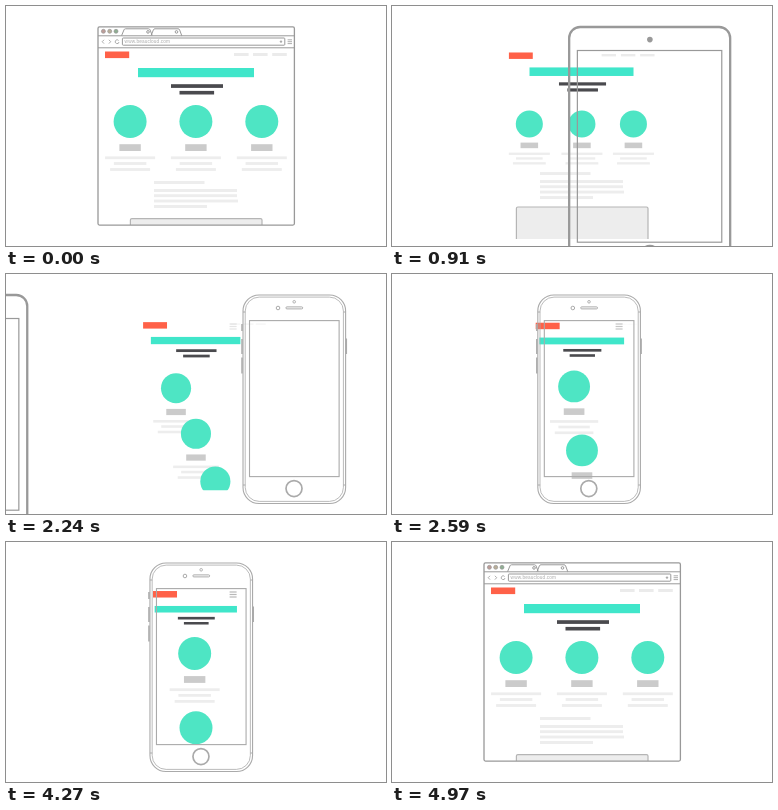
These frames come from a looping animation (380 by 240 pixels, 5320 ms). An HTML page:

```html
<!DOCTYPE html>
<html lang="en">
<head>
<meta charset="utf-8">
<title>Responsive layout</title>
<style>
html, body { margin: 0; width: 100%; height: 100%; overflow: hidden; background: #fff; }
svg { display: block; width: 100vw; height: 100vh; }
.line { fill: none; stroke: #999; }
text { font: 4.7px "Liberation Sans", Arial, sans-serif; letter-spacing: .15px; fill: #aaa; }
</style>
</head>
<body>
<svg viewBox="0 0 380 240">
  <defs>
    <clipPath id="clip"><rect id="clipRect" width="380" height="219"/></clipPath>
  </defs>
  <g id="page" clip-path="url(#clip)"></g>

  <g id="browser" class="line" stroke-width="1">
    <rect x="92" y="20.9" width="196.4" height="198.2" rx="1.5" stroke-width="1.3"/>
    <path d="M92 29.8H115.5M175.5 29.8H288.4M92 41.8H288.4"/>
    <path d="M115.5 29.8L118 23.8Q118.4 22.8 119.5 22.8H142.5Q143.6 22.8 144 23.8L146.2 29.4M115.5 29.8H145L147.4 23.8Q147.8 22.8 149 22.8H172Q173.2 22.8 173.6 23.8L175.8 29.8H145"/>
    <circle cx="142" cy="25.9" r="1.3"/>
    <circle cx="170.5" cy="25.9" r="1.3"/>
    <g stroke-width=".7">
      <circle cx="97.4" cy="25.3" r="2" fill="#bd9d98"/>
      <circle cx="103.7" cy="25.3" r="2" fill="#b9ae98"/>
      <circle cx="110" cy="25.3" r="2" fill="#8fae92"/>
    </g>
    <path stroke-width=".8" d="M98 33.8L96.2 35.7L98 37.6M102.9 33.8L104.7 35.7L102.9 37.6M112.6 34.5A1.9 1.9 0 1 0 113 36M281.6 33.8H286M281.6 35.7H286M281.6 37.6H286"/>
    <rect x="116.4" y="32" width="162.4" height="7.2" rx=".8"/>
    <circle cx="275" cy="35.6" r="1.2" fill="#aaa" stroke="none"/>
    <text x="118.6" y="37.2" stroke="none">www.beaucloud.com</text>
  </g>

  <g id="tablet" class="line">
    <rect x="109.3" y="21" width="161" height="260" rx="11" stroke-width="2.3"/>
    <rect x="117.5" y="44.5" width="144.4" height="191.7" stroke-width="1.2"/>
    <circle cx="190" cy="33.6" r="2.8" fill="#999" stroke="none"/>
    <circle cx="190" cy="249" r="9.6" stroke-width="1.3"/>
  </g>

  <g id="phone" class="line" style="stroke:#aaa">
    <rect x="139" y="21" width="102.6" height="208.5" rx="16" stroke-width="1.1"/>
    <rect x="141.2" y="23.1" width="98.2" height="204.3" rx="14" stroke-width=".8"/>
    <path stroke-width="1" d="M139 38H141.4M239.4 38H241.8M139 211H141.4M239.4 211H241.8"/>
    <path stroke-width="1.5" d="M138 50V57M138 65V80M138 83.5V99.5M242.3 64.5V80"/>
    <rect x="145.5" y="46.6" width="89.6" height="156" stroke-width="1.1"/>
    <circle cx="190.2" cy="27.8" r="1.3" stroke-width=".9"/>
    <circle cx="174" cy="34" r="1.8" stroke-width="1"/>
    <rect x="181.9" y="32.9" width="16.8" height="2" rx="1" stroke-width="1"/>
    <circle cx="190" cy="214.6" r="8" stroke-width="1.7"/>
  </g>
</svg>
<script>
const LOOP = 5320, STEP = 70;
const NS = "http://www.w3.org/2000/svg";
const byId = id => document.getElementById(id);
const page = byId("page");

const clamp = v => Math.max(0, Math.min(1, v));
const span = (t, from, to) => clamp((t - from) / (to - from));
const sineInOut = u => (1 - Math.cos(Math.PI * u)) / 2;
const sineOut = u => Math.sin(Math.PI / 2 * u);
const steepInOut = u => u < .5 ? (2 * u) ** 2.25 / 2 : 1 - (2 - 2 * u) ** 2.25 / 2;

function make(name, fill) {
  const el = document.createElementNS(NS, name);
  el.setAttribute("fill", fill);
  return page.appendChild(el);
}
function set(el, attrs) {
  for (const k in attrs) el.setAttribute(k, attrs[k]);
}
function box(el, x, y, width, height) {
  set(el, { x, y, width, height });
}
function slide(id, x) {
  byId(id).setAttribute("transform", `translate(${x} 0)`);
}

// Every value triple or row is ordered desktop, tablet, phone.
const bars = [
  ["#ff6148", [99, 45.5, 24.2, 6.6], [120.8, 46.7, 23.8, 6.4], [148, 49.1, 24, 6.5]],
  ["#40e6ca", [132, 62, 116, 9.2], [138.7, 61.3, 101.4, 8.4], [149, 64, 81.6, 6.5]],
  ["#4a4a4e", [165, 78.2, 52, 3.7], [167.4, 75.9, 46, 3.1], [172, 74.8, 36.6, 2.6]],
  ["#4a4a4e", [173.5, 84.9, 34.6, 3.6], [175.8, 81.8, 29.7, 3.1], [178, 79.9, 24.5, 2.5]]
].map(([fill, ...rows]) => ({ el: make("rect", fill), rows }));

// Extra sideways swing while the menu folds.
const nav = [
  { x: [228, 205.6, 223.5], swing: 33 },
  { x: [247, 225, 223.5], swing: 56 },
  { x: [266.2, 244.2, 223.5], swing: 75 }
].map(n => ({ ...n, el: make("rect", "#ebebeb") }));

const burger = [49.4, 51.9, 54.4].map(y => {
  const el = make("rect", "#b8b8b8");
  box(el, 223.6, y, 7, 1.2);
  return el;
});

const textLines = [[0, 50.5], [8, 83], [13.2, 83], [18.5, 84], [24, 53]]
  .map(([dy, w]) => ({ dy, w, el: make("rect", "#ededed") }));

const panel = make("rect", "#ededed");
set(panel, { stroke: "#b5b5b5", "stroke-width": 1.2, rx: 1.5 });

const columns = [
  { x: [124.1, 140.2, 190], y: [115.5, 118.5, 111.3] },
  { x: [189.9, 189.9, 190], y: [115.5, 118.5, 187.3] },
  { x: [255.8, 238.3, 190], y: [115.5, 118.5, 267] }
].map(c => ({
  ...c,
  disc: make("circle", "#4ee5c4"),
  label: make("rect", "#cbcbcb"),
  rows: [[36.3, 50], [42, 32.5], [48, 40]].map(([dy, w]) => ({ dy, w, el: make("rect", "#ededed") }))
}));

function drawPage(from, to, p) {
  const mix = v => v[from] + (v[to] - v[from]) * p;
  const folding = from === 1 && to === 2;
  const folded = (from === 2 ? 1 - p : 0) + (to === 2 ? p : 0);

  byId("clipRect").setAttribute("height", mix([219, 236, 203]));

  for (const { el, rows } of bars)
    box(el, ...rows[0].map((_, i) => mix(rows.map(r => r[i]))));

  for (const { el, x, swing } of nav) {
    box(el, mix(x) + (folding ? swing * p * (1 - p) : 0),
      mix([47, 48.2, 50]), mix([14.6, 14.4, 7]), mix([3, 2.3, 1.2]));
    el.setAttribute("opacity", 1 - folded);
  }
  for (const el of burger) el.setAttribute("opacity", clamp((folded - .4) / .55));

  const top = mix([176.5, 165.6, 288]);
  for (const { el, dy, w } of textLines) box(el, 148, top + dy - 1.45, w, 2.9);
  box(panel, 124.4, mix([212.6, 198.5, 400]), 131.6, 80);

  const r = mix([16.5, 12.9, 16.5]), s = r / 16.5;
  for (const { x, y, disc, label, rows } of columns) {
    const cx = mix(x), cy = mix(y);
    const centred = (el, dy, w, h) => box(el, cx - w * s / 2, cy + (dy - h / 2) * s, w * s, h * s);
    set(disc, { cx, cy, r });
    centred(label, 26.1, 21.4, 6.8);
    for (const { el, dy, w } of rows) centred(el, dy, w, 2.8);
  }
}

function draw(t) {
  const toTablet = sineInOut(span(t, 0, 1260));
  const toPhone = sineOut(span(t, 1610, 3150));
  const toDesktop = sineInOut(span(t, 4200, 4970));

  if (t < 1610) drawPage(0, 1, toTablet);
  else if (t < 4200) drawPage(1, 2, toPhone);
  else drawPage(2, 0, toDesktop);

  slide("browser", t < 4200 ? -380 * toTablet : -297 * (1 - steepInOut(span(t, 4200, 4970))));
  slide("tablet", 380 * (1 - toTablet) - .412 * Math.max(0, t - 1635.5));
  slide("phone", t < 4200 ? 380 * (1 - sineInOut(span(t, 1328, 2708))) : 245 * toDesktop);
}

const start = performance.now();
function tick() {
  const t = (performance.now() - start) % LOOP;
  draw(Math.floor(t / STEP) * STEP);
  requestAnimationFrame(tick);
}
tick();
</script>
</body>
</html>
```
